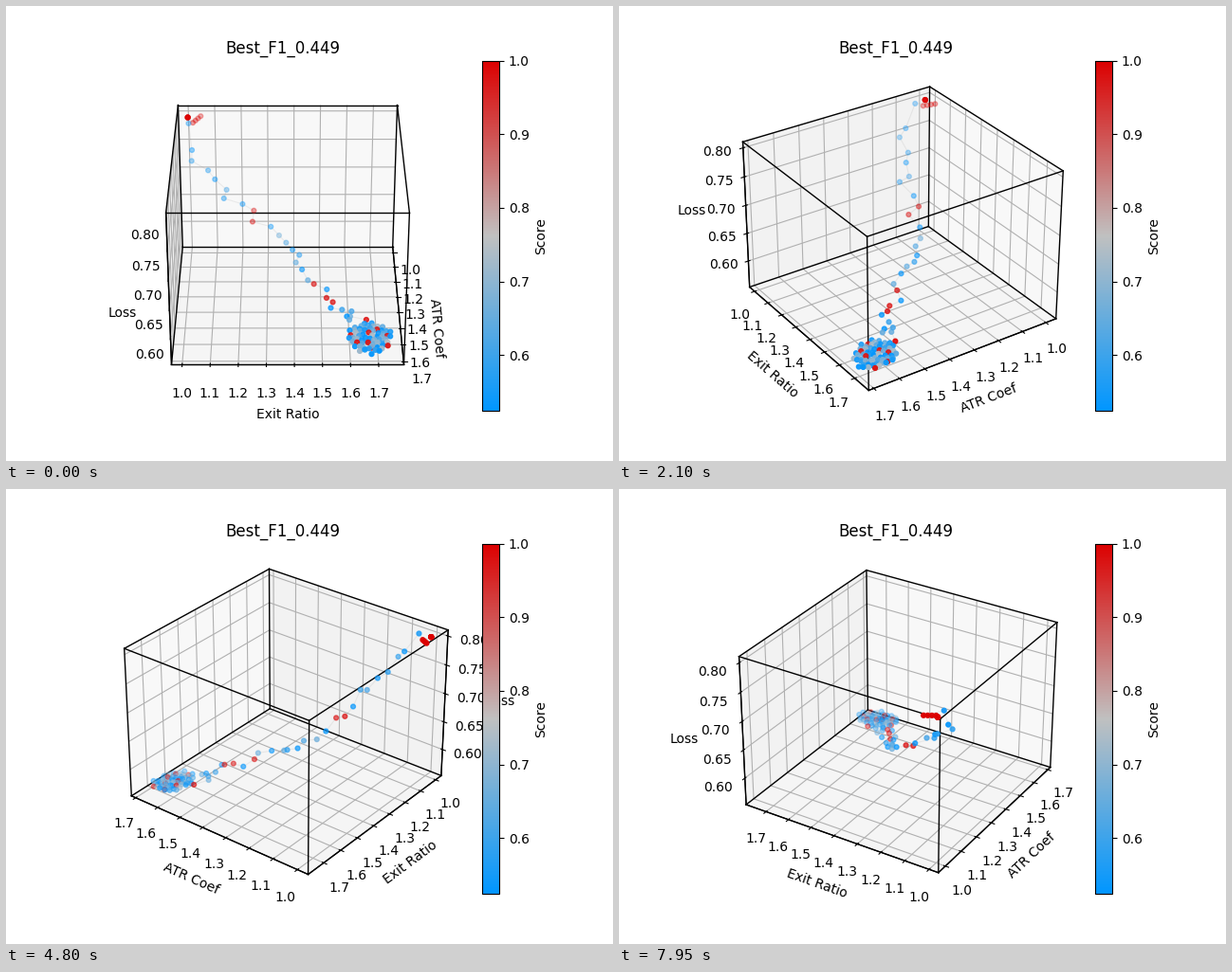
These frames come from a looping animation (640 px wide and 480 px high, 8000 ms). A matplotlib script:

```python
import itertools

import matplotlib.pyplot as plt
import numpy as np
from matplotlib.animation import FuncAnimation
from matplotlib.colors import LinearSegmentedColormap

ELEV = 30
STEP_DEG = 4
TICKS_PER_STEP = 3
LIMITS = ((0.9564, 1.7195), (0.962, 1.790), (0.552, 0.8102))
START = np.array((1.0, 1.0, 0.7985))
BEST = np.array((1.655, 1.6775, 0.563))
# Milestones of the search: ATR coefficient, exit ratio, loss.
MILESTONES = np.array([
    START, (1.094, 1.018, 0.763), (1.146, 1.104, 0.724), (1.178, 1.207, 0.688),
    (1.219, 1.313, 0.658), (1.282, 1.394, 0.633), (1.369, 1.429, 0.621),
    (1.426, 1.520, 0.601), (1.512, 1.533, 0.592), (1.537, 1.591, 0.584),
    (1.537, 1.662, 0.578),
])
rng = np.random.default_rng(4)


def opening():
    """Repeated tries at the start, then a short arc of good neighbours."""
    k = np.linspace(0, 1, 4)[:, None]
    arc = (1.021, 1.020, 0.794) + k * (-0.033, 0.028, 0.004)
    points = np.vstack([[START] * 8, arc, START + (0.046, 0.005, 0)])
    return points, np.append(np.ones(12), 0.56)


def descent():
    """Milestones with two scattered probes between each pair."""
    count = 3 * (len(MILESTONES) - 1) + 1
    index = np.arange(3, count)
    t = index / 3
    points = np.column_stack([np.interp(t, range(len(MILESTONES)), axis)
                              for axis in MILESTONES.T])
    probe = index % 3 > 0
    points += probe[:, None] * rng.normal(0, (0.012, 0.018, 0.002), points.shape)
    lucky = probe & ((abs(t - 3.5) < 0.4) | (abs(t - 7.3) < 0.7))
    score = np.where(probe, rng.uniform(0.56, 0.67, len(t)), 0.53)
    score[lucky] = 0.98
    score[-1] = 1
    return points, score


def convergence(count=64):
    """A disc of tries around the best point, loss falling with the coefficient."""
    i = np.arange(count)
    angle = i * np.pi * (3 - np.sqrt(5))
    radius = np.sqrt((i + 0.5) / count)
    x = 1.622 + 0.072 * radius * np.cos(angle)
    y = 1.672 + 0.080 * radius * np.sin(angle)
    z = 0.573 - 0.08 * (x - 1.6) + rng.normal(0, 0.0015, count)
    score = 0.53 + 0.22 * rng.random(count) ** 2
    score[4::9] = 0.97
    return (np.vstack([np.column_stack([x, y, z]), [BEST] * 3]),
            np.append(score, np.ones(3)))


points, scores = zip(opening(), descent(), convergence())
points, scores = np.vstack(points).T, np.concatenate(scores)

fig = plt.figure(figsize=(6.4, 4.8), dpi=100)
ax = fig.add_subplot(projection="3d")
cmap = LinearSegmentedColormap.from_list("score", ["#0096ff", "#c0c0c0", "#dc0000"])

ax.plot(*points, color="gray", alpha=0.12, lw=0.8)
for a, b in itertools.combinations(itertools.product((0, 1), repeat=3), 2):
    if sum(i != j for i, j in zip(a, b)) == 1:
        ends = [(lim[i], lim[j]) for lim, i, j in zip(LIMITS, a, b)]
        ax.plot(*ends, color="black", lw=1)
dots = ax.scatter(*points, c=scores, cmap=cmap, vmin=0.524, vmax=1.0, s=12)

ax.set(xlim=LIMITS[0], ylim=LIMITS[1], zlim=LIMITS[2], title="Best_F1_0.449",
       xlabel="ATR Coef", ylabel="Exit Ratio", zlabel="Loss")
fig.colorbar(dots, label="Score")


def update(tick):
    ax.view_init(elev=ELEV, azim=STEP_DEG * (tick // TICKS_PER_STEP))
    return ()


anim = FuncAnimation(fig, update, frames=160, interval=50, repeat=True,
                     repeat_delay=0, blit=False)
plt.show()
```
